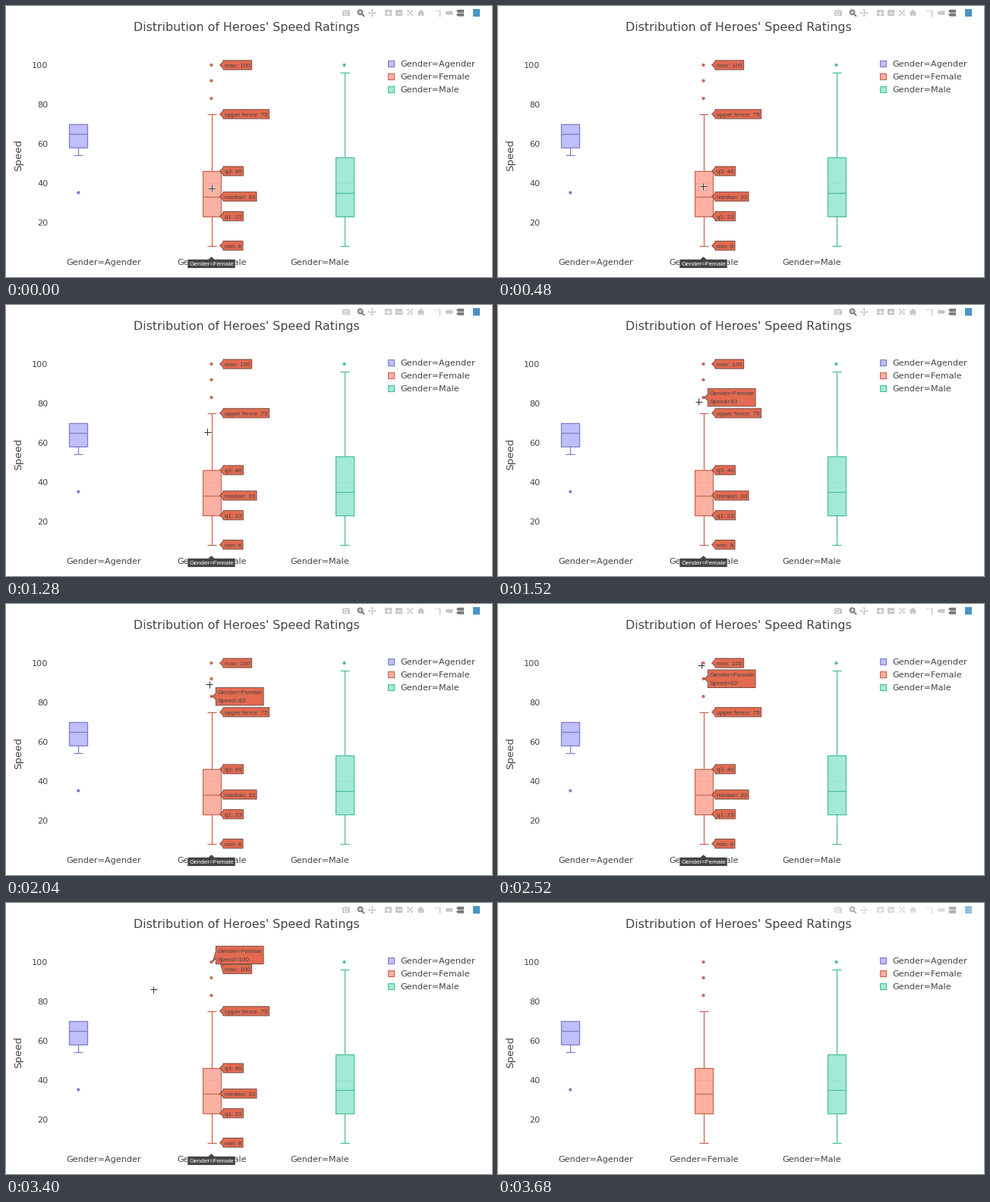
These frames come from a looping animation (640 by 358 pixels, 3720 ms). A matplotlib script:

```python
import numpy as np
import matplotlib.pyplot as plt
from matplotlib.animation import FuncAnimation
from matplotlib.patches import Circle, Polygon, Rectangle

W, H, DPI = 640, 358, 100
FRAMES, STEP = 93, 40
PT = 72 / DPI
INK = "#444444"
HOVER = "#e36a50"
PALE, ACTIVE, ACCENT = "#c6c6cb", "#77777c", "#4a94c6"

fig = plt.figure(figsize=(W / DPI, H / DPI), dpi=DPI, facecolor="white")
ax = fig.add_axes([0, 0, 1, 1])
ax.set_xlim(0, W)
ax.set_ylim(H, 0)
ax.axis("off")


def y_of(value):
    return 337.4 - 2.594 * value


def line(xs, ys, color, width=1.3, z=2, **kw):
    return ax.plot(xs, ys, color=color, lw=width * PT, zorder=z,
                   solid_capstyle="butt", **kw)[0]


def rect(x0, y0, x1, y1, fill, edge="none", width=1.0, z=2, **kw):
    return ax.add_patch(Rectangle((x0, y0), x1 - x0, y1 - y0, fc=fill, ec=edge,
                                  lw=width * PT, zorder=z, **kw))


def poly(points, fill, edge="none", width=1.0, z=2):
    return ax.add_patch(Polygon(points, closed=True, fc=fill, ec=edge,
                                lw=width * PT, zorder=z))


def text(x, y, s, size, color=INK, font="DejaVu Sans", z=3, **kw):
    return ax.text(x, y, s, fontsize=size * PT, color=color, family=font,
                   zorder=z, **kw)


# Chart

def box_plot(x, q1, median, q3, low, high, outliers, fill, edge):
    for end, start in ((low, q1), (high, q3)):
        if end != start:
            line([x, x], [y_of(start), y_of(end)], edge)
            line([x - 6, x + 6], [y_of(end)] * 2, edge)
    rect(x - 12, y_of(q3), x + 12, y_of(q1), fill, edge, 1.3)
    if q1 < 40 < q3:
        line([x - 11, x + 11], [y_of(40)] * 2, edge, 0.8, alpha=0.18)
    line([x - 12, x + 12], [y_of(median)] * 2, edge)
    for value in outliers:
        ax.add_patch(Circle((x, y_of(value)), 2.1, fc=edge, ec="none", zorder=2))


PURPLE = ("#bfbffc", "#8080c8")
RED = ("#f9b1a4", "#c96a56")
GREEN = ("#a3ead6", "#4dbfa0")

box_plot(95.3, 58, 65, 70, 54, 70, [35], *PURPLE)
box_plot(270.5, 23, 33, 46, 8, 75, [83, 92, 100], *RED)
box_plot(445.5, 23, 35, 53, 8, 96, [100], *GREEN)

text(317, 33.3, "Distribution of Heroes' Speed Ratings", 15.87, ha="center")
text(16.5, 197, "Speed", 13.4, rotation=90, ha="center", va="center")
for value in range(20, 101, 20):
    text(55.5, y_of(value) + 4, str(value), 11.2, ha="right")

NAMES = ["Gender=Agender", "Gender=Female", "Gender=Male"]
for i, (name, x, (fill, edge)) in enumerate(
        zip(NAMES, (128.5, 270.8, 412.7), (PURPLE, RED, GREEN))):
    text(x, 342, name, 11.3, ha="center")
    row = 76.3 + 16.8 * i
    rect(503, row - 4, 511, row + 4, fill, edge, 1.2)
    text(519, row + 4, name, 11.3)


# Toolbar

def tag(x, y, color, w=10, h=4):
    poly([(x, y), (x + 2, y - h / 2), (x + w, y - h / 2),
          (x + w, y + h / 2), (x + 2, y + h / 2)], color)


def arrows(x, y, turn):
    for k in range(4):
        a = turn + k * np.pi / 2
        d, n = np.array([np.cos(a), np.sin(a)]), np.array([-np.sin(a), np.cos(a)])
        c = np.array([x, y])
        line(*zip(c, c + 4 * d), PALE, 1.1)
        poly([c + 5.4 * d, c + 3 * d + 2 * n, c + 3 * d - 2 * n], PALE)


def toolbar():
    rect(442.5, 6, 452.5, 13, PALE)
    rect(445.5, 4.8, 449.5, 6.5, PALE)
    ax.add_patch(Circle((447.5, 9.5), 2.3, fc=PALE, ec="white", lw=PT, zorder=3))
    ax.add_patch(Circle((466.5, 8.3), 3.1, fc="#c8c8cc", ec=ACTIVE,
                        lw=1.6 * PT, zorder=2))
    line([468.8, 472], [10.6, 13.8], ACTIVE, 1.9)
    arrows(482, 9, 0)
    for x in (503, 517.5):
        rect(x - 4.5, 4.7, x + 4.5, 13.5, PALE)
        line([x - 2.8, x + 2.8], [9.1, 9.1], "white", 1.4, z=3)
    line([503, 503], [6.3, 11.9], "white", 1.4, z=3)
    arrows(532, 9, np.pi / 4)
    poly([(541, 9.5), (546.3, 4.5), (551.6, 9.5)], PALE)
    rect(542.8, 9, 549.8, 13.2, PALE)
    rect(545.5, 10.5, 547.1, 13.2, "white", z=3)
    line([563.5, 571], [6, 6], PALE, 1.2, linestyle=(0, (1.5, 1)))
    line([571, 571], [5.4, 13.5], PALE, 1.4)
    tag(578.3, 9.2, PALE, h=5)
    tag(593, 6.8, ACTIVE)
    tag(593, 11.6, ACTIVE)
    rect(614.5, 4.3, 624.3, 14, ACCENT)


toolbar()
veil = rect(438, 2, 628, 17, "white", z=8, alpha=0)


# Hover labels

def text_width(t):
    return t.get_window_extent(fig.canvas.get_renderer()).width * W / fig.bbox.width


def hover_label(x, value, lines, shift=0.0):
    """Tag with its tip at the data point; shift moves only the body."""
    tip, arrow, half = y_of(value), 4.3, 6.1 if len(lines) == 1 else 11.8
    mid, left = tip + shift, x + arrow
    parts = []
    for i, s in enumerate(lines):
        dy = 11 * (i - (len(lines) - 1) / 2)
        parts.append(text(left + 2.1, mid + dy + 2.9, s, 8.2,
                          font="Liberation Sans", z=6))
    right = left + max(text_width(t) for t in parts) + 4
    parts.append(poly([(x, tip), (left, mid + arrow), (left, mid + half),
                       (right, mid + half), (right, mid - half),
                       (left, mid - half), (left, mid - arrow)],
                      HOVER, "#6b4a44", 0.9, z=5))
    return parts


def axis_label(x, y, s):
    t = text(x, y + 12.3, s, 8.2, color="white", font="Liberation Sans",
             z=6, ha="center")
    half = text_width(t) / 2 + 2.2
    body = poly([(x, y), (x + 4.3, y + 3.7), (x + half, y + 3.7),
                 (x + half, y + 15.6), (x - half, y + 15.6),
                 (x - half, y + 3.7), (x - 4.3, y + 3.7)], INK, "white", 0.7, z=5)
    return [t, body]


STATS = [("upper fence", 75), ("q3", 46), ("median", 33), ("q1", 23), ("min", 8)]
stats = axis_label(270.5, 330.8, NAMES[1])
for name, value in STATS:
    stats += hover_label(281.6, value, [f"{name}: {value}"])
top_label = hover_label(281.6, 100, ["max: 100"])
top_pushed = hover_label(281.6, 100, ["max: 100"], 9.2)
points = {v: hover_label(272, v, [NAMES[1], f"Speed={v}"], s)
          for v, s in ((83, 0), (92, 0), (100, -9.2))}


# Pointer

halo = [line([], [], "white", 2.6, z=9, alpha=0.6) for _ in range(2)]
cross = [line([], [], "#303030", 1.0, z=10) for _ in range(2)]

PATH = np.array([
    (0, 270.5, 240.5), (560, 270, 238), (1000, 268, 224.5), (1200, 266, 188),
    (1400, 264.3, 137), (1520, 264, 127.5), (1680, 264.5, 125),
    (1780, 264.5, 125), (2040, 267.7, 106), (2320, 268, 93), (2520, 267.7, 80.5),
    (2680, 267, 77), (2880, 265, 77), (3100, 250, 87), (3400, 194, 114),
    (3480, 176, 121)])
LEAVE = 3440


def show(artists, on):
    for a in artists:
        a.set_visible(on)


def hovered_point(t):
    for start, value in ((2600, 100), (2120, 92), (1400, 83)):
        if t >= start:
            return value
    return None


def update(frame):
    t = frame * STEP
    inside = t < LEAVE
    point = hovered_point(t) if inside else None
    show(stats, inside)
    show(top_label, inside and point != 100)
    show(top_pushed, point == 100)
    for value, parts in points.items():
        show(parts, value == point)

    x, y = (np.interp(t, PATH[:, 0], PATH[:, k]) for k in (1, 2))
    for h, v in (halo, cross):
        h.set_data([x - 4.5, x + 4.5], [y, y])
        v.set_data([x, x], [y - 4.5, y + 4.5])
    show(halo + cross, t <= LEAVE)
    veil.set_alpha(np.clip((t - LEAVE) / 240, 0, 1) * 0.4)
    return []


anim = FuncAnimation(fig, update, frames=FRAMES, interval=STEP,
                     repeat=True, repeat_delay=0, blit=False)
plt.show()
```
